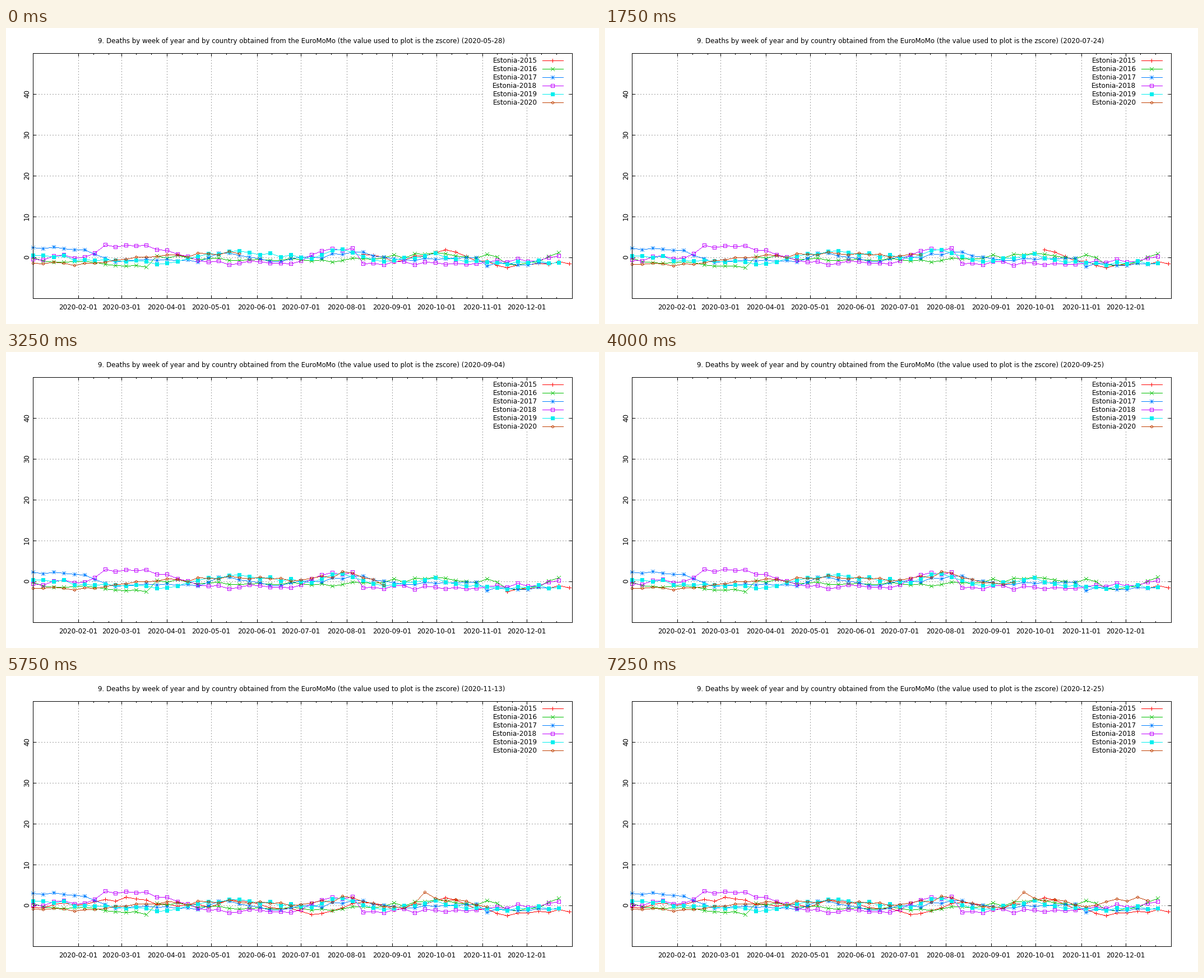
These frames come from a looping animation (1058x529 px, 7.5 s). A matplotlib script:

```python
import numpy as np
import matplotlib.pyplot as plt
from matplotlib.animation import FuncAnimation
from matplotlib.colors import to_rgb

W, H = 1058, 529
PX = 0.72  # points per pixel at 100 dpi
LEFT, RIGHT, TOP, BOTTOM = 48, 1010, 45, 483
DAY = (RIGHT - LEFT) / 366
FRAMES, INTERVAL = 30, 250
REBASE = 22  # first frame with the whole of 2015 and a new baseline

# year: colour, marker, (week, score) turning points of the trend
SERIES = {
    2015: ("#ff0000", "plus",
           [(0, -.4), (9, 1.5), (17, -.4), (19, 1.4), (28, -2.1), (32, .8), (35, -1),
            (40, 1.5), (46, -2.4), (52, -1.2)]),
    2016: ("#00c000", "cross",
           [(0, -.5), (6, -1.6), (11, -1.9), (12, .2), (30, -.6), (38, .7), (44, .3),
            (47, -2), (51, 1)]),
    2017: ("#0080ff", "star",
           [(0, 2), (4, 2.4), (8, -.8), (16, -1), (18, 1.2), (24, -1), (31, 1.3),
            (36, -.8), (43, .2), (44, -1.8), (51, -1.3)]),
    2018: ("#c000ff", "square",
           [(0, -.4), (6, .6), (7, 3), (11, 2.5), (15, .8), (17, -1.4), (26, -1.2),
            (28, 2), (31, 2.2), (32, -1.4), (44, -1.4), (51, .2)]),
    2019: ("#00eeee", "block",
           [(0, 1), (4, -.3), (13, -1.6), (19, 1.5), (27, 0), (29, 2.2), (33, -.6),
            (39, .5), (44, -1.3), (51, -.9)]),
    2020: ("#c04000", "circle",
           [(0, -1.4), (5, -1.8), (9, -.4), (18, 1), (27, .4), (30, 2), (36, -.6),
            (38, 2.6), (44, -1), (48, 1.1), (50, 1)]),
}

fig = plt.figure(figsize=(W / 100, H / 100), dpi=100, facecolor="white")
ax = fig.add_axes([0, 0, 1, 1])
ax.axis("off")


def day_x(day):
    return int(round(LEFT + DAY * day))


def score_y(score):
    return int(round(410 - 7.3 * score))


def rgb(color):
    return np.round(255 * np.array(to_rgb(color))).astype(np.uint8)


def line(canvas, x0, y0, x1, y1, color, dotted=False):
    """One pixel wide line without smoothing."""
    count = max(abs(x1 - x0), abs(y1 - y0)) + 1
    xs = np.linspace(x0, x1, count).round().astype(int)
    ys = np.linspace(y0, y1, count).round().astype(int)
    if dotted:
        on = np.arange(count) % 5 < 2
        xs, ys = xs[on], ys[on]
    canvas[ys, xs] = color


def polyline(canvas, points, color):
    for (x0, y0), (x1, y1) in zip(points, points[1:]):
        line(canvas, x0, y0, x1, y1, color)


def marker(canvas, x, y, kind, color, r=3):
    if kind in ("plus", "star"):
        line(canvas, x - r, y, x + r, y, color)
        line(canvas, x, y - r, x, y + r, color)
    if kind in ("cross", "star"):
        line(canvas, x - r, y - r, x + r, y + r, color)
        line(canvas, x - r, y + r, x + r, y - r, color)
    if kind == "block":
        canvas[y - r:y + r + 1, x - r:x + r + 1] = color
    if kind == "square":
        box(canvas, x - r, y - r, x + r, y + r, color)
    if kind == "circle":
        angles = np.pi / 8 + np.arange(9) * np.pi / 4
        ring = [(x + int(round(2.24 * np.cos(a))), y + int(round(2.24 * np.sin(a))))
                for a in angles]
        polyline(canvas, ring, color)


def box(canvas, x0, y0, x1, y1, color):
    polyline(canvas, [(x0, y0), (x1, y0), (x1, y1), (x0, y1), (x0, y0)], color)


def label(x, y, text, size=12, **style):
    return ax.text(x, y, text, family="DejaVu Sans", size=size * PX, va="baseline", **style)


def tick_pair_x(canvas, x, size):
    line(canvas, x, TOP, x, TOP + size, 0)
    line(canvas, x, BOTTOM - size, x, BOTTOM, 0)


def draw_axes(canvas):
    grey = rgb("#a0a0a0")
    months = np.arange("2020-02", "2021-01", dtype="datetime64[M]").astype("datetime64[D]")
    for month in months:
        day = int((month - np.datetime64("2020-01-01")).astype(int))
        x = day_x(day)
        line(canvas, x, BOTTOM, x, TOP, grey, dotted=True)
        tick_pair_x(canvas, x, 5)
        for part in (1, 2):
            tick_pair_x(canvas, day_x(day + part * 10.15), 2)
        label(x - .5, 503, str(month), ha="center")
    for score in range(0, 50, 10):
        y = score_y(score)
        line(canvas, LEFT, y, RIGHT, y, grey, dotted=True)
        line(canvas, LEFT, y, LEFT + 5, y, 0)
        line(canvas, RIGHT - 5, y, RIGHT, y, 0)
        label(41, y - .5, str(score), ha="center", rotation=90, rotation_mode="anchor")


def draw_key(canvas):
    canvas[51:141, 853:1003] = 255  # the key interrupts the grid
    for row, (year, (color, kind, _)) in enumerate(SERIES.items()):
        y = 58 + 15 * row
        label(947.5, y + 4, f"Estonia-{year}", ha="right")
        line(canvas, 957, y, 994, y, rgb(color))
        marker(canvas, 975, y, kind, rgb(color))


def base_scores(year):
    """Trend through the turning points plus weekly noise."""
    turns, levels = zip(*SERIES[year][2])
    weeks = np.arange(turns[-1] + 1)
    noise = np.random.default_rng(year).uniform(-.55, .55, len(weeks))
    return np.interp(weeks, turns, levels) + noise


def revision(weeks, frame):
    """Seasonal shift of the scores as the baseline is re-estimated."""
    season = np.cos(2 * np.pi * weeks / 52)
    if frame >= REBASE:
        return .18 + .37 * season
    return -.1 * (1 + season) * np.sin(np.pi * frame / REBASE)


def scores_at(year, frame):
    """First visible week and the scores from there on."""
    scores = BASE[year].copy()
    if year == 2015:
        first = 0 if frame >= REBASE else 32 + frame + (frame > 0)
        return first, scores[first:]
    scores += revision(np.arange(len(scores)), frame)
    if year == 2020:
        scores = scores[:21 + frame + (frame > 0)]
        if 0 < frame < REBASE:
            scores[-1] -= .75  # newest week is still under-reported
    return 0, scores


BASE = {year: base_scores(year) for year in SERIES}
background = np.full((H, W, 3), 255, np.uint8)
draw_axes(background)
draw_key(background)
picture = ax.imshow(background, extent=(0, W, H, 0), aspect="auto",
                    interpolation="nearest", zorder=0)
title = label(527, 27, "", size=11.8, ha="center")


def update(frame):
    date = np.datetime64("2020-06-05") + 7 * frame if frame else "2020-05-28"
    title.set_text("9. Deaths by week of year and by country obtained from the EuroMoMo "
                   f"(the value used to plot is the zscore) ({date})")
    canvas = background.copy()
    for year, (color, kind, _) in SERIES.items():
        first, scores = scores_at(year, frame)
        points = [(day_x(7 * (first + i)), score_y(s)) for i, s in enumerate(scores)]
        polyline(canvas, points, rgb(color))
        for x, y in points:
            marker(canvas, x, y, kind, rgb(color))
    box(canvas, LEFT, TOP, RIGHT, BOTTOM, 0)
    picture.set_data(canvas)
    return picture, title


anim = FuncAnimation(fig, update, frames=FRAMES, interval=INTERVAL, repeat=True,
                     repeat_delay=0, blit=False)
plt.show()
```
